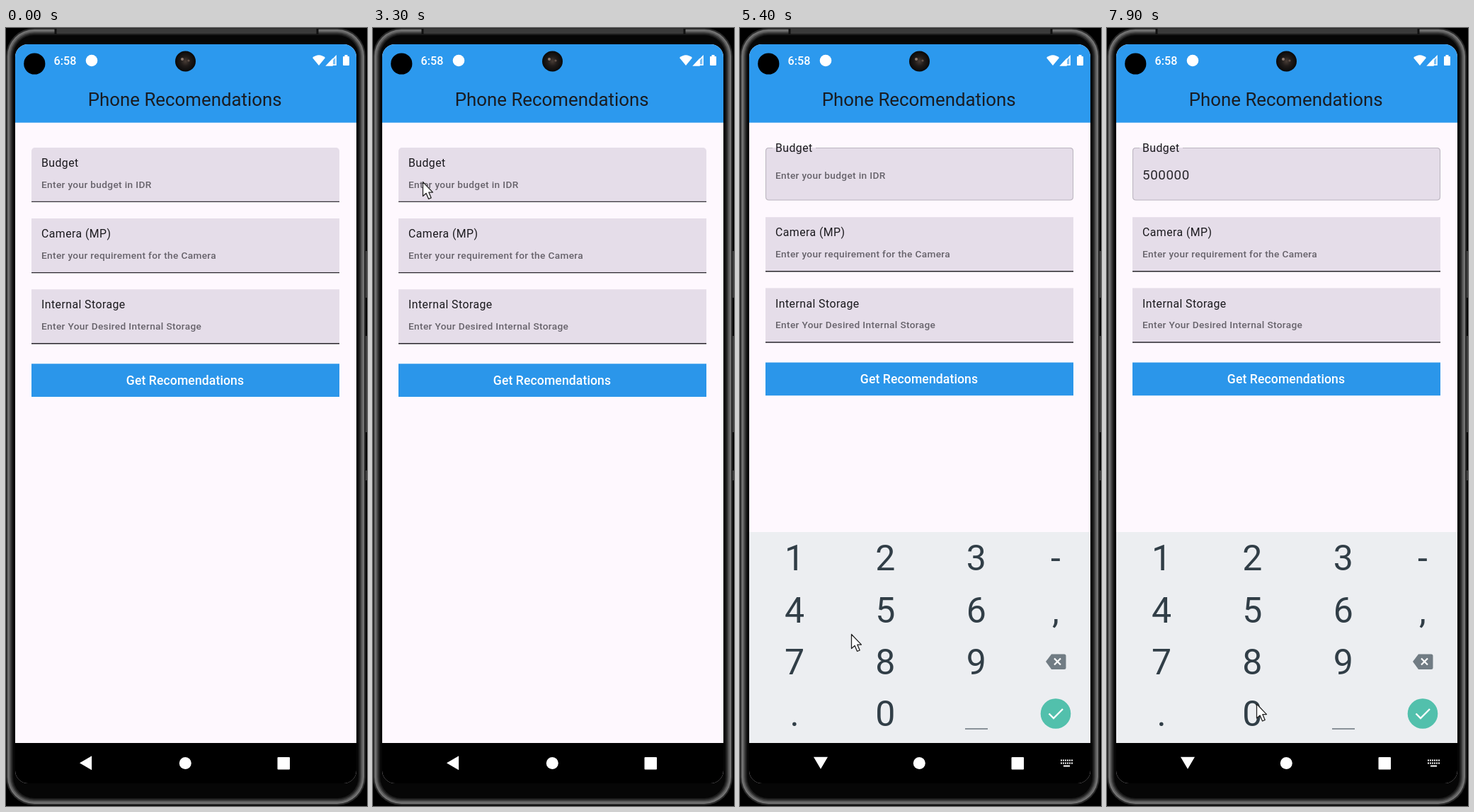
Write an HTML page that moves like this. It is 510x1099 px and loops after 8000 ms.

```html
<!DOCTYPE html>
<html lang="en">
<head>
<meta charset="utf-8">
<title>Phone Recomendations</title>
<style>
  html, body { margin: 0; width: 100%; height: 100%; overflow: hidden; background: #000; }
  svg { display: block; width: 100%; height: 100%; font-family: Roboto, sans-serif; }
  text { white-space: pre; }
  .label { font-size: 15.85px; letter-spacing: .44px; fill: #1b1a1e; }
  .hint { font-size: 13.7px; letter-spacing: .33px; font-weight: 500; fill: #67636b; }
  .value { font-size: 18.8px; letter-spacing: .587px; fill: #2a282d; }
  .key { font-size: 50px; text-anchor: middle; fill: #313e47; }
  .mid { text-anchor: middle; }
</style>
</head>
<body>
<svg viewBox="0 0 510 1099">
  <defs>
    <radialGradient id="lens">
      <stop offset="0" stop-color="#493d36"/><stop offset=".45" stop-color="#211c1a"/><stop offset="1" stop-color="#090909"/>
    </radialGradient>
    <clipPath id="screen"><rect x="13" y="23" width="482" height="1044" rx="18"/></clipPath>
    <clipPath id="page"><rect x="13" y="133" width="482" height="877"/></clipPath>
  </defs>

  <rect width="510" height="1099"/>
  <g fill="#3c3c3c">
    <rect x="506" y="315" width="4" height="66"/>
    <rect x="506" y="435" width="4" height="136"/>
    <rect x="507" y="625" width="3" height="14"/>
  </g>
  <g id="shell"></g>
  <path d="M70 4.500H440" stroke="#3a3a3a" stroke-width="7"/>
  <path d="M70 1v8M440 1v8" stroke="#111" stroke-width="3"/>

  <g clip-path="url(#screen)">
    <rect x="13" y="23" width="482" height="1044" fill="#fef8fe"/>
    <rect x="13" y="23" width="482" height="110.700" fill="#2c99ee"/>
    <text class="mid" x="252.700" y="109.700" font-size="25.83" fill="#191c22">Phone Recomendations</text>
    <text x="67.5" y="52" font-size="16.2" font-weight="500" fill="#fff">6:58</text>
    <g fill="#fff">
      <circle cx="121" cy="46" r="8.3"/>
      <path d="M433 42Q442 34.500 451 42L442 53Z"/>
      <path d="M467 38V53H453Z" fill-opacity=".35"/>
      <path d="M461 44.500V53H453ZM466 40V52H455Z" fill="none" stroke="#fff" stroke-width="1.500"/>
      <path d="M453 53L462 43.500V53Z"/>
      <path d="M478.500 40V38H482.500V40H484Q485 40 485 41V52Q485 53 484 53H477Q476 53 476 52V41Q476 40 477 40Z"/>
    </g>
    <circle cx="40.300" cy="50.500" r="15.100"/>
    <g id="form" clip-path="url(#page)"></g>
    <g clip-path="url(#page)"><g id="board"></g></g>
    <rect x="13" y="1010" width="482" height="57"/>
    <g fill="#fff">
      <path id="back" d="M-8.600 0L8.500 -10V10Z"/>
      <circle cx="253.300" cy="1038.500" r="8.500"/>
      <rect x="383.500" y="1030" width="17.500" height="17.500" rx="1"/>
      <path id="switch" d="M453 1034.500H470M453 1038.500H470" stroke="#fff" stroke-width="2" stroke-dasharray="2 1"/>
      <path id="switchBar" d="M457 1042.500H466" stroke="#fff" stroke-width="2"/>
    </g>
  </g>
  <circle cx="253.500" cy="47" r="14.500" fill="url(#lens)"/>
  <circle cx="249" cy="44" r="2" fill="#8d7a70"/>
  <circle cx="258" cy="46" r="1.600" fill="#625249"/>
  <path id="pointer" d="M0 0V20L4.600 15.900L8.100 24L11.700 22.400L8.300 14.600H14Z"
        fill="#fff" stroke="#222" stroke-width="1.300" stroke-linejoin="round"/>
</svg>
<script>
const NS = 'http://www.w3.org/2000/svg';
const LOOP = 8000, STEP = 100;
const $ = id => document.getElementById(id);

function set(node, attrs) {
  for (const k in attrs) node.setAttribute(k, attrs[k]);
  return node;
}
function add(parent, tag, attrs, text) {
  const node = set(document.createElementNS(NS, tag), attrs);
  if (text) node.textContent = text;
  return parent.appendChild(node);
}
const clamp = v => Math.max(0, Math.min(1, v));
const ease = v => v * v * (3 - 2 * v);
const mix = (a, b, p) => a + (b - a) * p;
const ramp = (t, from, to) => ease(clamp((t - from) / (to - from)));
const show = (node, on) => node.setAttribute('visibility', on ? 'visible' : 'hidden');

// Phone shell: nested rings from the outer edge inwards
['#2b2b2b', '#747474', '#606060', '#3a3a3a', '#1c1c1c', '#060606'].forEach((fill, i) => {
  const d = 2 * i;
  add($('shell'), 'rect', { x: d, y: d, width: 508 - 2 * d, height: 1098 - 2 * d, rx: 40 - d, fill });
});

// Form
const form = $('form');
const PANEL = '#e5dde9';
const budget = {
  box: add(form, 'rect', { x: 36, y: 169, width: 435, rx: 4.7, fill: PANEL }),
  foot: add(form, 'rect', { x: 36, width: 435, height: 8, fill: PANEL }),
  line: add(form, 'path', { stroke: '#37343a', 'stroke-width': 1.3 }),
  edge: add(form, 'path', {
    d: 'M46 169.500H40.500Q36.500 169.500 36.500 174V238.500Q36.500 243 41 243H466Q470.500 243 470.500 238.500V174Q470.500 169.500 466 169.500H107',
    fill: 'none', stroke: '#bcb6c0', 'stroke-width': 1.1 }),
  label: add(form, 'text', { class: 'label', x: 50 }, 'Budget'),
  hint: add(form, 'text', { class: 'hint', x: 50 }, 'Enter your budget in IDR'),
  value: add(form, 'text', { class: 'value', x: 50, y: 214 }),
  caret: add(form, 'rect', { y: 191, width: 2.2, height: 28.5, fill: '#151417' })
};
const rest = add(form, 'g', {});
function field(y, label, hint) {
  add(rest, 'rect', { x: 36, y, width: 435, height: 77, fill: PANEL });
  add(rest, 'path', { d: `M36 ${y + 76.6}H471`, stroke: '#29272c', 'stroke-width': 1.4 });
  add(rest, 'text', { class: 'label', x: 50, y: y + 27.2 }, label);
  add(rest, 'text', { class: 'hint', x: 50, y: y + 56.7 }, hint);
}
field(269, 'Camera (MP)', 'Enter your requirement for the Camera');
field(369.2, 'Internal Storage', 'Enter Your Desired Internal Storage');
add(rest, 'rect', { x: 36, y: 474.3, width: 435, height: 46.7, fill: '#2b96ea' });
add(rest, 'text', { class: 'mid', x: 253, y: 503.6, fill: '#fff', 'font-size': 17.6, 'font-weight': 500, 'letter-spacing': .1 }, 'Get Recomendations');

// Number pad
const board = $('board');
add(board, 'rect', { x: 13, y: 712, width: 482, height: 298, fill: '#eceef1' });
const pressed = add(board, 'rect', { x: 145, width: 121, height: 55, fill: '#cfd3d7' });
['123-', '456,', '789', '.0'].forEach((row, r) => {
  [...row].forEach((c, i) => add(board, 'text', { class: 'key', x: [77, 205.4, 333.8, 446][i], y: 766.2 + 73.4 * r }, c));
});
add(board, 'path', { d: 'M318 990H350', stroke: '#56616a', 'stroke-width': 1.3 });
add(board, 'path', { d: 'M432 895L440 884.500H458Q460.500 884.500 460.500 887V903.500Q460.500 906 458 906H440Z', fill: '#717c84' });
add(board, 'path', { d: 'M444 890.500L453 899.500M453 890.500L444 899.500', stroke: '#fff', 'stroke-width': 2.2 });
add(board, 'circle', { cx: 446, cy: 968.5, r: 21.3, fill: '#52c0ac' });
add(board, 'path', { d: 'M436.500 968.500L443 975L456 962', fill: 'none', stroke: '#fff', 'stroke-width': 2.4 });

// Timeline
const FOCUS = 3600;
const keys = [[5800, '5'], [6700, '0'], [6900, '0'], [7000, '0'], [7200, '0'], [7400, '0']];
const holds = [[5800, 6000, 794], [6700, 6900, 941], [7000, 7100, 941], [7200, 7400, 941]];
const blinks = [3800, 4450, ...keys.map(k => k[0])];
const path = [
  [800, 240, 300], [1100, 120, 164], [1400, 120, 164], [2100, 250, 754], [2400, 250, 754],
  [2600, 235, 765], [3300, 70, 217], [3400, 69, 216], [4800, 69, 216], [5400, 157, 856],
  [5700, 208, 818], [6000, 208, 818], [6500, 211, 954.5], [8000, 211, 954.5]
];

function pointerAt(t) {
  const i = Math.max(1, path.findIndex(p => p[0] > t));
  const a = path[i - 1], b = path[i], p = ramp(t, a[0], b[0]);
  return [mix(a[1], b[1], p), mix(a[2], b[2], p)];
}
function caretOn(t) {
  const start = blinks.filter(b => b <= t).pop();
  return start !== undefined && Math.floor((t - start) / 500) % 2 === 0;
}

function draw(t) {
  const p = ramp(t, FOCUS, FOCUS + 200);
  const typed = keys.filter(k => k[0] <= t).map(k => k[1]).join('');
  const bottom = mix(246, 243.3, p);
  set(budget.box, { height: bottom - 169 });
  set(budget.foot, { y: bottom - 8, opacity: 1 - p });
  set(budget.line, { d: `M36 ${bottom - .7}H471`, opacity: 1 - p });
  set(budget.edge, { opacity: p });
  set(budget.label, { y: mix(196.2, 175.3, p) });
  set(budget.hint, { y: mix(225.5, 213.2, p) });
  show(budget.hint, !typed);
  budget.value.textContent = typed;
  set(budget.caret, { x: 50 + typed.length * 11.15 });
  show(budget.caret, caretOn(t));
  set(rest, { transform: `translate(0 ${-1.8 * p})` });

  const up = ramp(t, 4500, 4700);
  set(board, { transform: `translate(0 ${298 * (1 - up)})` });
  show(board, up > 0);
  set($('back'), { transform: `translate(${mix(112.6, 114, up)} 1038.2) rotate(${-90 * up})` });
  show($('switch'), t >= 3800);
  show($('switchBar'), t >= 3800);

  const hold = holds.find(h => t >= h[0] && t < h[1]);
  set(pressed, { y: hold ? hold[2] : 941, opacity: hold ? 1 : 0 });

  const [x, y] = pointerAt(t);
  set($('pointer'), { transform: `translate(${x + .5} ${y + .5})` });
  show($('pointer'), t >= 800);
}

const begin = performance.now();
function tick() {
  const t = (performance.now() - begin) % LOOP;
  draw(Math.floor(t / STEP) * STEP);
  requestAnimationFrame(tick);
}
draw(0);
requestAnimationFrame(tick);
</script>
</body>
</html>
```
